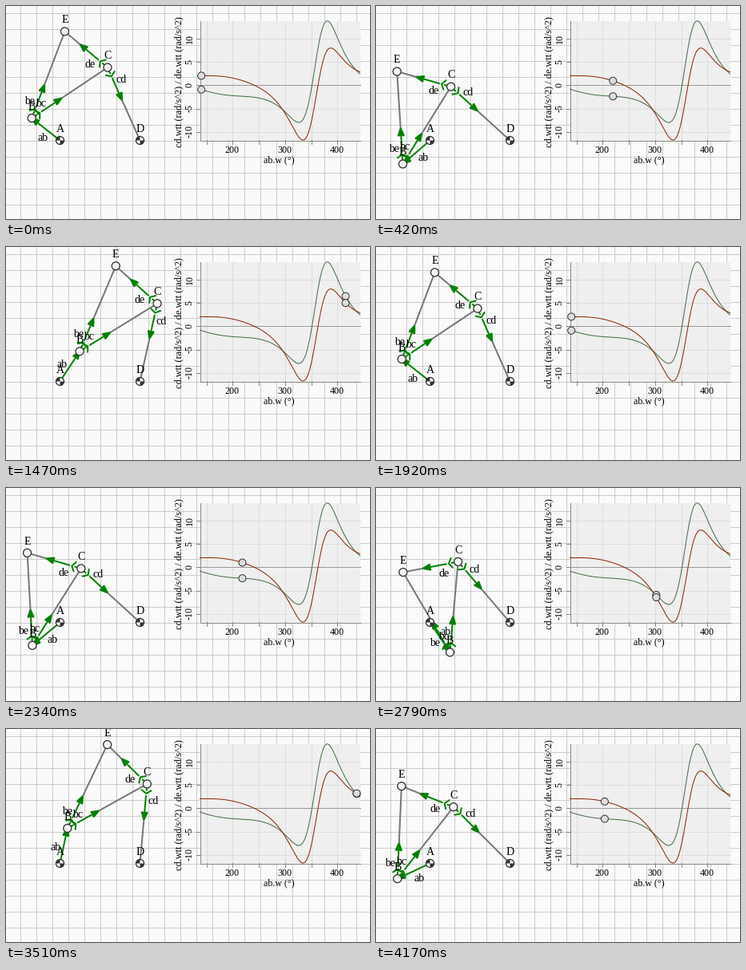
These frames come from a looping animation (455 px wide and 267 px high, 4.2 s). A matplotlib script:

```python
import numpy as np
import matplotlib.pyplot as plt
from matplotlib.animation import FuncAnimation
from matplotlib.patches import Circle, Polygon, Rectangle, Wedge

W, H, DPI = 455, 267, 100
PX = 72 / DPI
FRAMES, STEP = 140, 30

A, D = np.array([67.5, 168.5]), np.array([167.5, 168.5])
AB, BC, CD, CE = 45, 114, 100, 70
KNEE = np.radians(106)          # fixed angle between bc and de
OMEGA = np.pi                   # crank speed, rad/s
LAG = np.radians(3)             # accelerations trail by one time step
DRAG = 0.4                      # slight damping of the accelerations
LEAD = 0.7                      # crank runs ahead of the chart, degrees

GREEN, LINK, NODE = '#008000', '#777777', '#333333'
COLORS = '#426F42', '#8B2500'

# crank angle in degrees over the frame number
KEYS = [0, 28, 49, 54, 64, 93, 117, 139]
ANGLES = [140.9, 299.7, 416.2, 442.9, 500.9, 663, 797.4, 924.5]
W_MAX = 443                     # last angle inside the chart
LEFT, TOP, WIDTH, HEIGHT = 242.5, 18.5, 200, 150

plt.rcParams['font.family'] = 'Liberation Serif'
fig = plt.figure(figsize=(W / 100, H / 100), dpi=DPI, facecolor='#fafafa')
ax = fig.add_axes([0, 0, 1, 1])
ax.set_xlim(0, W)
ax.set_ylim(H, 0)
ax.axis('off')


def polar(w):
    """Unit vector with y pointing down the screen."""
    return np.array([np.cos(w), -np.sin(w)])


def angles(w):
    """Directions of bc and cd for crank angle w (radians)."""
    bx, by = AB * np.cos(w), AB * np.sin(w)
    dx, dy = bx - (D - A)[0], by
    d = np.hypot(dx, dy)
    beta = np.arccos((d**2 + CD**2 - BC**2) / (2 * d * CD))
    psi = np.arctan2(dy, dx) % (2 * np.pi) - beta
    bc = np.arctan2(CD * np.sin(psi) - by, (D - A)[0] + CD * np.cos(psi) - bx)
    return bc, psi + np.pi


def accel(w, h=0.16):
    """Angular accelerations (cd, de) by finite differences."""
    lo, mid, hi = (np.array(angles(w - LAG + s)) for s in (-h, 0, h))
    bc, cd = (lo + hi - 2 * mid) * (OMEGA / h)**2 + DRAG * (hi - lo) / (2 * h)
    return cd, bc


def chart_x(deg):
    return 282.9 + 0.655 * (deg - 200)


def chart_y(v):
    return 98.9 - 5.83 * v


def line(xs, ys, color, lw=1, z=1, **kw):
    return ax.plot(xs, ys, color=color, lw=lw * PX, zorder=z, **kw)[0]


def label(x, y, s, size=12, rotation=0, z=9):
    if rotation:
        return ax.text(x, y, s, size=size * PX, rotation=rotation,
                       ha='center', va='center', zorder=z)
    return ax.text(x, y + 0.337 * size, s, size=size * PX,
                   ha='center', va='baseline', zorder=z)


def circle(p, r, fill, lw, z):
    return ax.add_patch(Circle(p, r, fc=fill, ec=NODE, lw=lw * PX, zorder=z))


def draw_grid():
    for x in np.arange(17.5, W, 20):
        line([x, x], [0, H], '#cccccc', z=0)
    for y in np.arange(8.5, H, 20):
        line([0, W], [y, y], '#cccccc', z=0)


def draw_chart():
    right, bottom = LEFT + WIDTH, TOP + HEIGHT
    ax.add_patch(Rectangle((LEFT, TOP), WIDTH, HEIGHT, fc='#efefef', lw=0, zorder=1))
    for deg in range(150, 450, 50):
        x = np.floor(chart_x(deg)) + 0.5
        line([x, x], [TOP, bottom], '#dddddd', z=2)
        line([x, x], [bottom - 1, bottom + 4], '#888888', z=3)
        if deg % 100 == 0:
            label(chart_x(deg), 179.5, str(deg))
    for v in range(-10, 11, 5):
        y = np.floor(chart_y(v)) + 0.5
        line([LEFT, right], [y, y], '#dddddd' if v else '#999999', z=2)
        line([LEFT - 5, LEFT], [y, y], '#888888', z=3)
        label(229.5, chart_y(v), str(v), rotation=90)
    line([LEFT, LEFT, right], [TOP, bottom, bottom], '#888888', z=3)
    label(341.5, 192.5, 'ab.w (°)')
    label(216.5, 95, 'cd.wtt (rad/s^2) / de.wtt (rad/s^2)', 12.2, 90)
    deg = np.linspace(138.2, 443.5, 400)
    for v, color in zip(accel(np.radians(deg)), COLORS):
        line(chart_x(deg), chart_y(v), color, z=4)


class Link:
    """Vector arrow near the start joint, plain bar for the rest."""

    def __init__(self, name, driven=False):
        self.bar = line([], [], LINK, 2, 5, solid_capstyle='butt')
        pieces = [[(0, 0), (35, 0)]] if driven else [
            [(0, 0), (8, 0)], [(8, 6), (12, 0), (8, -6)], [(15, 0), (35, 0)]]
        self.pieces = [np.array(p) for p in pieces]
        self.strokes = [line([], [], GREEN, 2, 6, solid_capstyle='round',
                             solid_joinstyle='round') for _ in pieces]
        self.tip = np.array([(45, 0), (35.5, -3.6), (36.5, 0), (35.5, 3.6)])
        self.head = ax.add_patch(Polygon(self.tip, fc=GREEN, ec=GREEN, lw=2 * PX,
                                         joinstyle='miter', zorder=6))
        self.text = label(0, 0, name, 14)

    def place(self, p, q):
        u = (q - p) / np.hypot(*(q - p))
        n = np.array([u[1], -u[0]])
        frame = np.array([u, n])
        for stroke, pts in zip(self.strokes, self.pieces):
            stroke.set_data(*(p + pts @ frame).T)
        self.head.set_xy(p + self.tip @ frame)
        self.bar.set_data(*np.array([p + 45 * u, q]).T)
        x, y = p + 20 * u + 10 * n
        self.text.set_position((x, y + 0.337 * 14))


class Joint:
    def __init__(self, name, p=(0, 0), fixed=False):
        self.dot = circle(p, 5, '#ffffff' if fixed else '#f4f4f4', 1.3, 7)
        if fixed:
            for a in (0, 180):
                ax.add_patch(Wedge(p, 5, a, a + 90, fc=NODE, lw=0, zorder=8))
        self.text = label(p[0], p[1] - 15.5, name, 14)

    def place(self, p):
        self.dot.center = p
        self.text.set_position((p[0], p[1] - 15.5 + 0.337 * 14))


draw_grid()
draw_chart()
links = {n: Link(n, n == 'ab') for n in ('ab', 'bc', 'cd', 'be', 'de')}
Joint('A', A, True)
Joint('D', D, True)
joints = {n: Joint(n) for n in 'BCE'}
marks = [circle((0, 0), 4.5, '#dedede', 1, 8) for _ in COLORS]


def update(i):
    total = np.interp(i, KEYS, ANGLES)
    deg = (total - 140) % 360 + 140
    w = np.radians(deg + LEAD)
    bc, cd = angles(w)
    B = A + AB * polar(w)
    C = D - CD * polar(cd)
    E = C + CE * polar(bc + KNEE)
    for name, p in zip('BCE', (B, C, E)):
        joints[name].place(p)
    for name, p, q in (('ab', A, B), ('bc', B, C), ('cd', C, D),
                       ('be', B, E), ('de', C, E)):
        links[name].place(p, q)
    for mark, v in zip(marks, accel(np.radians(deg))):
        mark.center = chart_x(deg), chart_y(v)
        mark.set_visible(bool(deg <= W_MAX))
    return []


anim = FuncAnimation(fig, update, frames=FRAMES, interval=STEP,
                     repeat=True, repeat_delay=0, blit=False)
plt.show()
```
